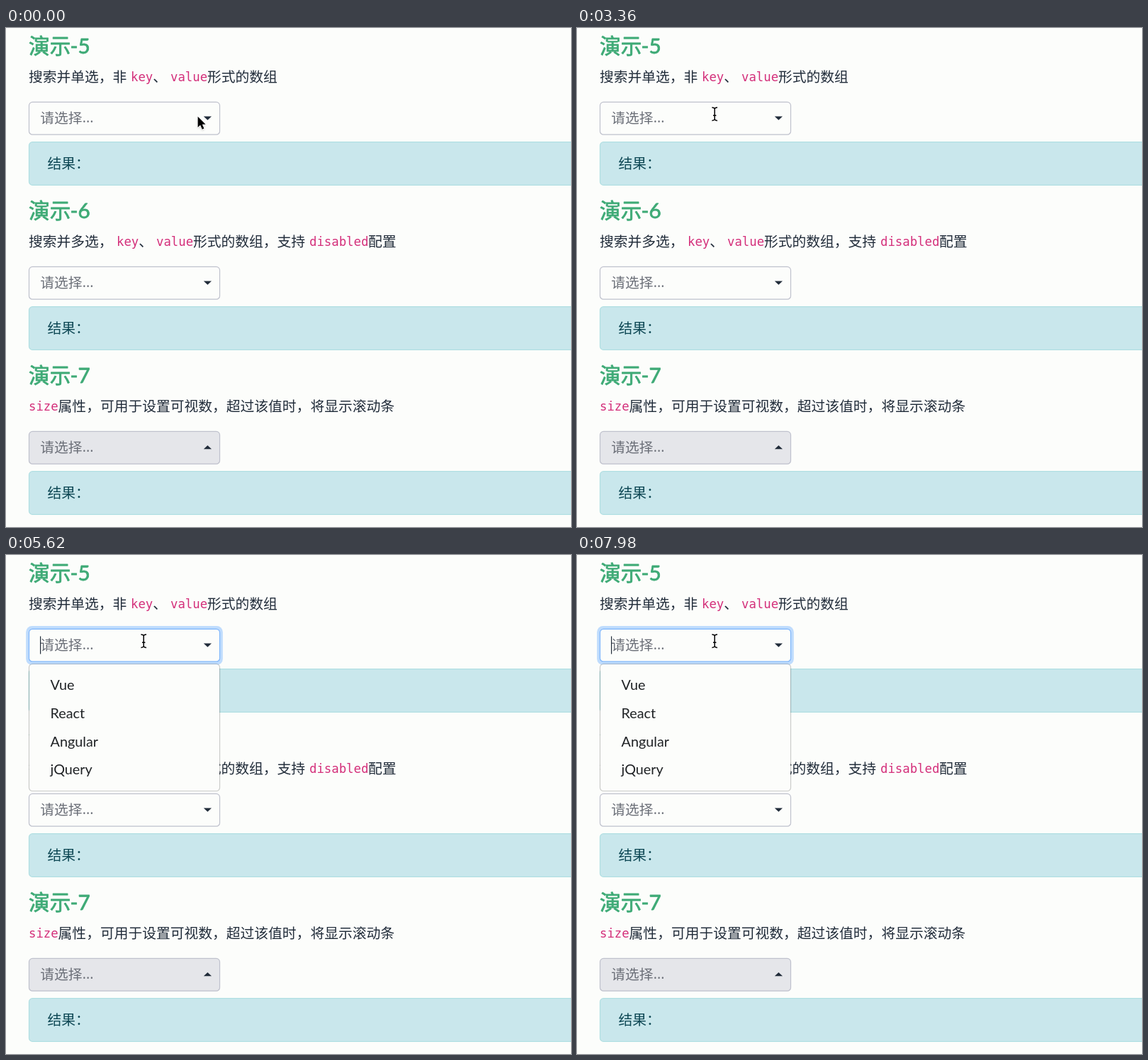
These frames come from a looping animation (797 by 703 pixels, 8 s). An HTML page with a canvas:

```html
<!DOCTYPE html>
<html lang="zh-CN">
<head>
<meta charset="utf-8">
<title>演示</title>
<style>
  html, body { margin: 0; width: 100%; height: 100%; overflow: hidden; background: #fcfdfb; }
  canvas { display: block; }
</style>
</head>
<body>
<canvas id="stage" width="797" height="703"></canvas>
<script>
const ctx = document.getElementById('stage').getContext('2d');
const LOOP = 8000;
const SECTION = 232;
const EM = 19.78;

const PRESS = 44, WAKE = 54, OPEN = 109, HOLD = 7, BLINK = 30;

const CJK = '"Noto Sans CJK SC", "Noto Sans CJK", sans-serif';
const LATIN = 'Lato, sans-serif';
const BODY = `${EM}px ${CJK}`;
const CODE = `${EM * 0.875}px "DejaVu Sans Mono", monospace`;
const HEAD = `${EM * 1.5}px ${CJK}`;

const PAPER = '#fcfdfb', INK = '#212c3a', PINK = '#d4307b', GREEN = '#3eaa76', GREY = '#6b6f78', TEAL = '#0d4754';

// Code runs are marked with a backtick; each run starts at its own x.
const descriptions = [
  [[32, '搜索并单选，非'], [176, '`key'], [207.3, '、'], [232, '`value'], [284, '形式的数组']],
  [[32, '搜索并多选，'], [156, '`key'], [187.3, '、'], [212, '`value'], [264, '形式的数组，支持'], [428, '`disabled'], [511, '配置']],
  [[32, '`size'], [73.6, '属性，可用于设置可视数，超过该值时，将显示滚动条']]
];
const options = ['Vue', 'React', 'Angular', 'jQuery'];

function text(str, x, y, font, color, bold = 0) {
  ctx.font = font;
  ctx.fillStyle = color;
  ctx.fillText(str, x, y);
  if (bold) {
    ctx.strokeStyle = color;
    ctx.lineWidth = bold;
    ctx.lineJoin = 'round';
    ctx.strokeText(str, x, y);
  }
}

function box(x, y, w, h, r, fill, stroke) {
  ctx.beginPath();
  ctx.roundRect(x, y, w, h, r);
  if (fill) { ctx.fillStyle = fill; ctx.fill(); }
  if (stroke) { ctx.strokeStyle = stroke; ctx.lineWidth = 1.2; ctx.stroke(); }
}

function polygon(points, fill) {
  ctx.beginPath();
  points.forEach(([x, y]) => ctx.lineTo(x, y));
  ctx.closePath();
  ctx.fillStyle = fill;
  ctx.fill();
}

function select(top, disabled, focus) {
  if (focus > 0) {
    ctx.globalAlpha = focus;
    box(28.2, top - 4.4, 277.6, 55, 8.5, '#bfdcfd');
    ctx.globalAlpha = 1;
  }
  const border = focus > 0.5 ? '#7fb6fb' : '#bfc1cd';
  box(32.5, top, 269, 45.8, 4.8, disabled ? '#e5e6ea' : PAPER, border);
  text('请选择', 48.3, top + 29.4, BODY, GREY);
  text('...', 107.8, top + 29, `${EM}px "Open Sans", sans-serif`, GREY);
  const y = top + 22.5, dir = disabled ? -1 : 1;
  polygon([[278.8, y - 2.4 * dir], [290, y - 2.4 * dir], [284.4, y + 2.8 * dir]], INK);
}

function section(i, focus) {
  ctx.save();
  ctx.translate(0, i * SECTION);
  text('演示', 32, 36.3, HEAD, GREEN, 0.8);
  text('-' + (i + 5), 90.6, 35.8, `${EM * 1.5}px ${LATIN}`, GREEN, 0.8);
  for (const [x, run] of descriptions[i]) {
    if (run[0] === '`') text(run.slice(1), x, 75.3, CODE, PINK);
    else text(run, x, 75.8, BODY, INK);
  }
  box(32.5, 160.7, 800, 60.6, 4.8, '#c9e7ec', '#b1dfe2');
  text('结果：', 58.5, 198, BODY, TEAL);
  select(104.4, i === 2, focus);
  ctx.restore();
}

function dropdown() {
  box(33, 154, 268, 178, 4.4, PAPER);
  box(32.5, 153.5, 269, 179, 4.8, null, 'rgba(0,0,0,.2)');
  options.forEach((name, i) => text(name, 62.6, 190.4 + i * 39.55, `${EM}px ${LATIN}`, '#1f2225'));
}

function arrow(x, y) {
  const shape = [[0, 0], [0, 17.5], [4, 13.8], [7.1, 20.6], [10.1, 19.3], [7.1, 12.6], [12.6, 12.6]];
  ctx.save();
  ctx.translate(x, y);
  ctx.scale(0.87, 0.87);
  ctx.shadowColor = 'rgba(0,0,0,.3)';
  ctx.shadowBlur = 3;
  ctx.shadowOffsetY = 1.5;
  polygon(shape, '#fff');
  ctx.shadowColor = 'transparent';
  ctx.strokeStyle = '#fff';
  ctx.lineWidth = 2;
  ctx.lineJoin = 'round';
  ctx.stroke();
  polygon(shape, '#000');
  ctx.restore();
}

function beam(x, y) {
  ctx.save();
  ctx.translate(x, y);
  ctx.beginPath();
  for (const side of [-1, 1]) {
    ctx.moveTo(-3.8, 9.2 * side);
    ctx.quadraticCurveTo(0, 9.2 * side, 0, 6.5 * side);
    ctx.quadraticCurveTo(0, 9.2 * side, 3.8, 9.2 * side);
  }
  ctx.moveTo(0, -7);
  ctx.lineTo(0, 7);
  ctx.moveTo(-2.2, 2);
  ctx.lineTo(2.2, 2);
  for (const [color, width] of [['#fff', 3.4], ['#000', 1.5]]) {
    ctx.strokeStyle = color;
    ctx.lineWidth = width;
    ctx.stroke();
  }
  ctx.restore();
}

function ring(x, y) {
  ctx.beginPath();
  ctx.arc(x, y, 26.5, 0, Math.PI * 2);
  ctx.strokeStyle = '#000';
  ctx.lineWidth = 2;
  ctx.stroke();
}

const progress = (n, from, to) => Math.min(1, Math.max(0, (n - from) / (to - from)));
const easeOut = p => 1 - (1 - p) ** 2;
const smooth = p => p * p * (3 - 2 * p);
const pressed = (n, from) => n >= from && n < from + HOLD;

// Playback is uneven: every 140 ms hold three ticks of 20, 100 and 20 ms.
function tickAt(ms) {
  const rest = ms % 140;
  return 3 * Math.floor(ms / 140) + (rest >= 20) + (rest >= 120);
}

function pointer(n) {
  const a = easeOut(progress(n, 0, 16));
  const b = smooth(progress(n, WAKE, WAKE + 15));
  return [270.6 - 58 * a - 18.4 * b, 124.8 - 9.2 * a + 5.6 * b];
}

function draw(n) {
  ctx.fillStyle = PAPER;
  ctx.fillRect(0, 0, 797, 703);
  const focus = smooth(progress(n, OPEN - 1, OPEN + 8));
  for (let i = 0; i < 3; i++) section(i, i === 0 ? focus : 0);
  if (n >= OPEN) {
    dropdown();
    if ((n - OPEN) % (2 * BLINK) < BLINK) {
      ctx.fillStyle = INK;
      ctx.fillRect(48, 114.5, 1.2, 25);
    }
  }
  const [x, y] = pointer(n);
  if (pressed(n, PRESS) || pressed(n, OPEN - 1)) ring(x - 0.5, y + 0.4);
  if (n < WAKE) arrow(x, y);
  else beam(x, y);
}

const start = performance.now();
function play() {
  draw(tickAt((performance.now() - start) % LOOP));
  requestAnimationFrame(play);
}
play();
</script>
</body>
</html>
```
